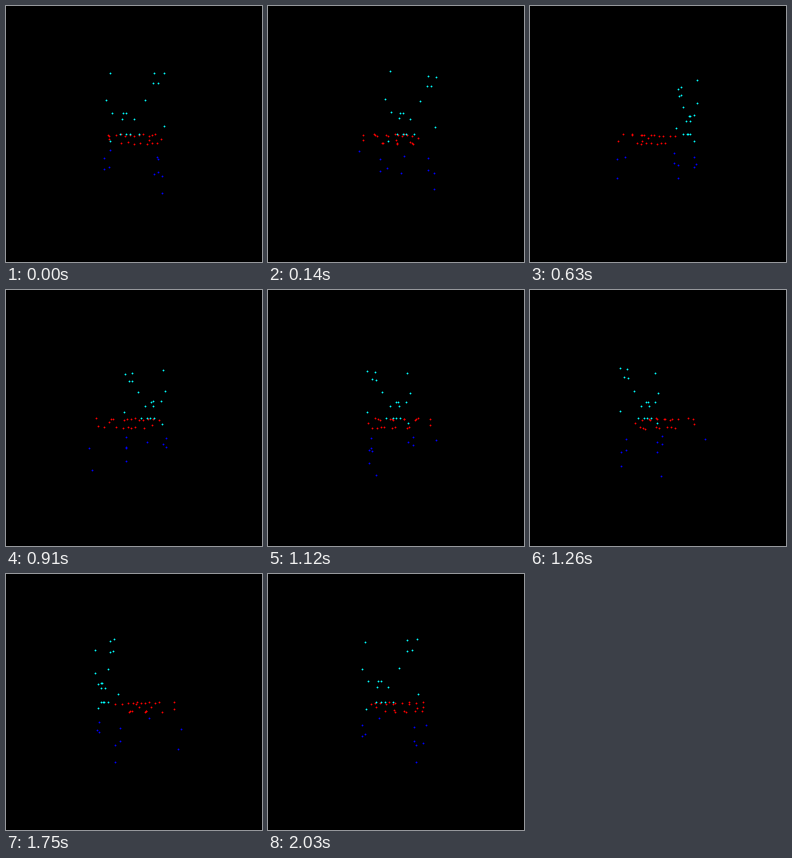
These frames come from a looping animation (256 by 256 pixels, 2100 ms). A matplotlib script:

```python
import numpy as np
import matplotlib.pyplot as plt
from matplotlib.animation import FuncAnimation

SIZE, DPI = 256, 64
FRAMES, INTERVAL = 30, 70
CENTER = 127.7
DOT = 1.8  # diameter in pixels
FOCAL = SIZE / 2 / np.tan(np.radians(30))  # 60 degree field of view
GOLDEN = (5 ** 0.5 - 1) / 2


def make_back():
    """Dots on the rails (height: positions across) of a leaning plane."""
    rails = {
        -52: (-20, 17, 25.5), -43: (16.3, 20.6), -29: (-23.5, 9.3),
        -18: (-18.6, -9.4, -6.8), -13: (-10.3, 0), -6.5: (26,),
        0: (-11.7, -6.9, -3.5, 4.3), 6.5: (-20.7,),
    }
    return [(x, y, 30 - 0.06 * y) for y, xs in rails.items() for x in xs]


def make_legs():
    """Dots down the edges (x, z: heights) of the posts."""
    edges = {
        (21.6, 26.5): (22.2, 33.6), (24, 32): (35.8, 50.4),
        (-26, 26.5): (21.5, 31.2), (-21.5, 31): (28.5,),
        (24, -37.2): (46.6,), (27.3, -37.2): (27,), (-28, -37.2): (19.6,),
    }
    return [(x, y, z) for (x, z), ys in edges.items() for y in ys]


def scatter_layer(n, xs, ys, zs, phase):
    """Spread n dots evenly over a sheet with a golden-ratio lattice."""
    i = np.arange(n)
    depth = (phase + i * GOLDEN) % 1
    return np.column_stack([np.linspace(*xs, n),
                            ys[0] + np.ptp(ys) * depth,
                            zs[0] + np.ptp(zs) * depth])


def make_seat():
    rim = [(17.5, 7.7, -37), (-27.5, 6.4, -23), (27.3, 4.9, -2)]
    top = scatter_layer(12, (-28, 24), (0.5, 2.4), (-32, 17), 0.22)
    under = scatter_layer(7, (-12.5, 25), (9.5, 9.8), (-22, 15), 0.46)
    return np.vstack([rim, top, under])


def project(points, angle):
    """Turn the points about the vertical axis and project them to pixels."""
    x, y, z = points.T
    c, s = np.cos(angle), np.sin(angle)
    scale = FOCAL / (FOCAL - (z * c - x * s))
    return CENTER + np.column_stack([(x * c + z * s) * scale, y * scale])


fig = plt.figure(figsize=(SIZE / DPI, SIZE / DPI), dpi=DPI, facecolor="black")
ax = fig.add_axes([0, 0, 1, 1])
ax.set(xlim=(0, SIZE), ylim=(SIZE, 0))
ax.axis("off")

parts = []
for points, color in ((make_legs(), "blue"), (make_seat(), "red"),
                      (make_back(), "cyan")):
    dots = ax.scatter([], [], s=(DOT * 72 / DPI) ** 2, color=color, linewidths=0)
    parts.append((np.array(points), dots))


def draw(frame):
    angle = 2 * np.pi * frame / FRAMES
    for points, dots in parts:
        dots.set_offsets(project(points, angle))
    return [dots for _, dots in parts]


anim = FuncAnimation(fig, draw, frames=FRAMES, interval=INTERVAL,
                     repeat=True, repeat_delay=0, blit=False)
plt.show()
```
